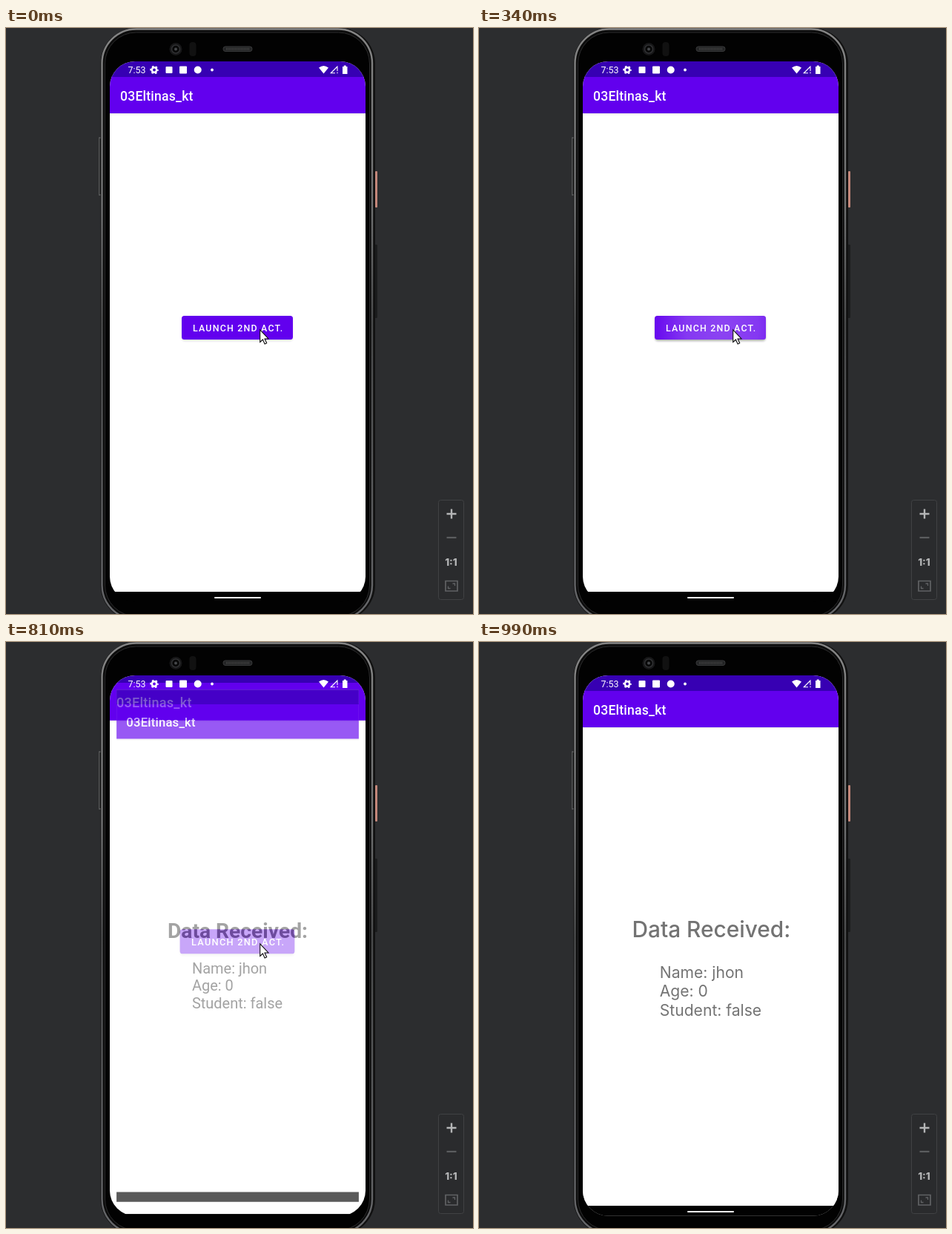
Write an HTML page that moves like this. It is 630 px wide and 790 px high and loops after 1480 ms.

```html
<!DOCTYPE html>
<html lang="en">
<head>
<meta charset="utf-8">
<title>Launch second activity</title>
<style>
html, body { margin: 0; width: 100%; height: 100%; overflow: hidden; background: #2c2d2f; }
svg { display: block; width: 630px; height: 790px; }
text { font-family: Roboto, sans-serif; }
.title { font-size: 17.56px; font-weight: 500; letter-spacing: .22px; fill: #fff; }
.label { font-size: 12.4px; font-weight: 500; letter-spacing: 1.2px; fill: #fff; }
.head { font-size: 29.8px; text-anchor: middle; fill: #737373; }
.body { font-size: 21.1px; fill: #737373; }
.final text, .ratio { font-family: Inter, sans-serif; }
.bold { font-weight: 700; }
.medium { font-weight: 500; }
.ratio { font-size: 13.5px; font-weight: 800; text-anchor: middle; fill: #b4b5b6; }
</style>
</head>
<body>
<svg viewBox="0 0 630 790">
  <defs>
    <clipPath id="glass"><rect x="140" y="45" width="345" height="728.5" rx="34"/></clipPath>
    <radialGradient id="glow" gradientUnits="userSpaceOnUse" cx="328" cy="404" r="98">
      <stop stop-color="#fff" stop-opacity=".27"/>
      <stop offset=".5" stop-color="#fff" stop-opacity=".22"/>
      <stop offset="1" stop-color="#fff" stop-opacity="0"/>
    </radialGradient>
    <linearGradient id="drop" x2="0" y2="1">
      <stop stop-color="#000" stop-opacity=".09"/>
      <stop offset="1" stop-color="#000" stop-opacity="0"/>
    </linearGradient>
    <linearGradient id="rim" x2="0" y2="1">
      <stop stop-color="#858585"/>
      <stop offset=".3" stop-color="#707172"/>
      <stop offset=".5" stop-color="#4a4b4c"/>
      <stop offset="1" stop-color="#66676a"/>
    </linearGradient>
    <filter id="soft" x="-10%" y="-40%" width="120%" height="190%"><feGaussianBlur stdDeviation="1.5"/></filter>
    <g id="chrome">
      <path fill="#fff" d="M140 45h345v715h-345z"/>
      <path fill="#020202" d="M140 760h345v14h-345z"/>
      <path fill="url(#drop)" d="M140 115h345v3h-345z"/>
      <path fill="#6200ee" d="M140 65h345v50h-345z"/>
      <path fill="#3700b3" d="M140 45h345v21h-345z"/>
      <text class="title" x="154" y="98">03Eltinas_kt</text>
    </g>
  </defs>

  <!-- phone -->
  <rect x="125" y="147" width="3" height="79" rx="1" fill="#555657"/>
  <rect x="126.500" y="149" width="2" height="75" fill="#151515"/>
  <rect x="498" y="193" width="3" height="49" rx="1" fill="#c4877a"/>
  <rect x="497" y="292" width="4" height="99" rx="1" fill="#1b1c1d"/>
  <rect x="127.500" y="0" width="370.500" height="799" rx="48" fill="#111"/>
  <rect x="129.500" y="1.500" width="364.500" height="795.500" rx="46" fill="#0c0c0c" stroke="url(#rim)" stroke-width="2.400"/>
  <rect x="133.500" y="6" width="357" height="787" rx="42" fill="#020202" stroke="#2b2b2c"/>
  <circle cx="229" cy="28.500" r="8.500" fill="#171718"/>
  <circle cx="229" cy="28.500" r="5.500" fill="#080808" stroke="#303133" stroke-width="1.500"/>
  <circle cx="229" cy="28.500" r="2" fill="#46484b"/>
  <rect x="247.500" y="19" width="9" height="19" rx="4" fill="#111"/>
  <rect x="293" y="25" width="39" height="6.500" rx="3" fill="#232425" stroke="#38393a"/>
  <path d="M297 28.300h31" stroke="#444" stroke-width="3" stroke-dasharray="1 1"/>

  <!-- display -->
  <g clip-path="url(#glass)">
    <path fill="#020202" d="M140 45h345v729h-345z"/>
    <g id="first">
      <use href="#chrome"/>
      <rect id="shade" x="237.500" y="390" width="149" height="32" rx="4" filter="url(#soft)"/>
      <rect x="237" y="388" width="150" height="32" rx="3.500" fill="#6200ee"/>
      <rect id="ripple" x="237" y="388" width="150" height="32" rx="3.500" fill="url(#glow)"/>
      <text class="label" x="252" y="409">LAUNCH 2ND ACT.</text>
    </g>
    <g id="second">
      <use href="#chrome"/>
      <g id="moving">
        <text class="head bold" x="312.500" y="398">Data Received:</text>
        <text class="body" x="247.500" y="448.700">Name: jhon</text>
        <text class="body" x="247.500" y="473.500">Age: 0</text>
        <text class="body" x="247.500" y="498.300">Student: false</text>
      </g>
      <g id="settled" class="final">
        <text class="head medium" x="313.400" y="398">Data Received:</text>
        <text class="body" x="243.800" y="452.500">Name: jhon</text>
        <text class="body" x="243.800" y="478">Age: 0</text>
        <text class="body" x="243.800" y="503.500">Student: false</text>
      </g>
    </g>

    <!-- system icons -->
    <g fill="#fff">
      <text x="164.500" y="61" font-size="12.400">7:53</text>
      <circle cx="200" cy="56.500" r="3.200" fill="none" stroke="#fff" stroke-width="2.600"/>
      <circle cx="200" cy="56.500" r="4.900" fill="none" stroke="#fff" stroke-width="1.700" stroke-dasharray="2.560 2.570" stroke-dashoffset="1.280"/>
      <rect x="215.500" y="52" width="9" height="9" rx="1"/>
      <rect x="234" y="51.500" width="10" height="10" rx="1"/>
      <circle cx="258.700" cy="56.500" r="5"/>
      <circle cx="278" cy="56.500" r="1.900"/>
      <path d="M422 53.500q6.500-5 13 0l-6.500 8z"/>
      <path d="M438 61l9.500-9.500M437.500 60.800h6.500M447 53v5M447 59.500v1.800" fill="none" stroke="#fff" stroke-width="1.100"/>
      <path d="M454 52h1.700v-1.500h3V52h1.800v10h-6.500z"/>
      <rect x="281" y="767" width="63" height="2" rx="1"/>
    </g>
  </g>

  <path id="cursor" d="M342.700 406.800v16.700l3.700-3.500 2.700 5.900 2.600-1.200-2.700-5.700h5z" fill="#fff" stroke="#111" stroke-width="1.100"/>

  <!-- zoom panel -->
  <rect x="583.500" y="636.500" width="34" height="134" rx="3" fill="#2a2b2d" stroke="#404244"/>
  <path d="M594.500 655h13M601 648.500v13" stroke="#b4b5b6" stroke-width="2.400"/>
  <path d="M594.500 687h13" stroke="#5b5d5f" stroke-width="2.200"/>
  <text class="ratio" x="600.500" y="725">1:1</text>
  <g fill="none" stroke="#606264">
    <path d="M593 745.500h16v13.500h-16z" stroke-width="1.700"/>
    <path d="M602.500 749h3v3M599.500 755.500h-3v-3" stroke-width="1.300"/>
  </g>
</svg>
<script>
const LOOP = 1480, TAP = 240, OPEN = 773, SETTLED = 990;
const ticks = [0, 50, 100, 150, 240, 290, 340, 390, 480, 570, 620, 665, 710, 760, 810, 850, 900, 945, 990];
const el = id => document.getElementById(id);
const clamp = v => Math.max(0, Math.min(1, v));
const set = (id, attrs) => {
  for (const key in attrs) el(id).setAttribute(key, attrs[key]);
};
const zoom = s => `translate(312.5 409) scale(${s}) translate(-312.5 -409)`;
const show = (id, on) => el(id).style.display = on ? "" : "none";

function draw(t) {
  const press = clamp((t - TAP) / 150);
  const release = clamp((t - 390) / 180);
  const pressed = t < TAP ? 0 : 1 - release;
  set("glow", { cx: 345 - 26 * press, r: 25 + 110 * press });
  set("ripple", { opacity: pressed });
  set("shade", { opacity: .12 + .3 * press * pressed });

  const done = t >= SETTLED;
  const p = done ? 1 : t < OPEN ? 0 : 1 - Math.exp((OPEN - t) / 35.4);
  set("first", { transform: zoom(1 + .049 * p), opacity: 1 - .23 * clamp((t - 820) / 30) });
  set("second", { transform: zoom(.85 + .15 * p), opacity: clamp((t - OPEN) / 57) });
  show("second", t >= OPEN);
  show("moving", !done);
  show("settled", done);
  show("cursor", !done);
}

function frame(now) {
  const t = now % LOOP;
  draw(ticks.findLast(tick => tick <= t) ?? 0);
  requestAnimationFrame(frame);
}
draw(0);
requestAnimationFrame(frame);
</script>
</body>
</html>
```
